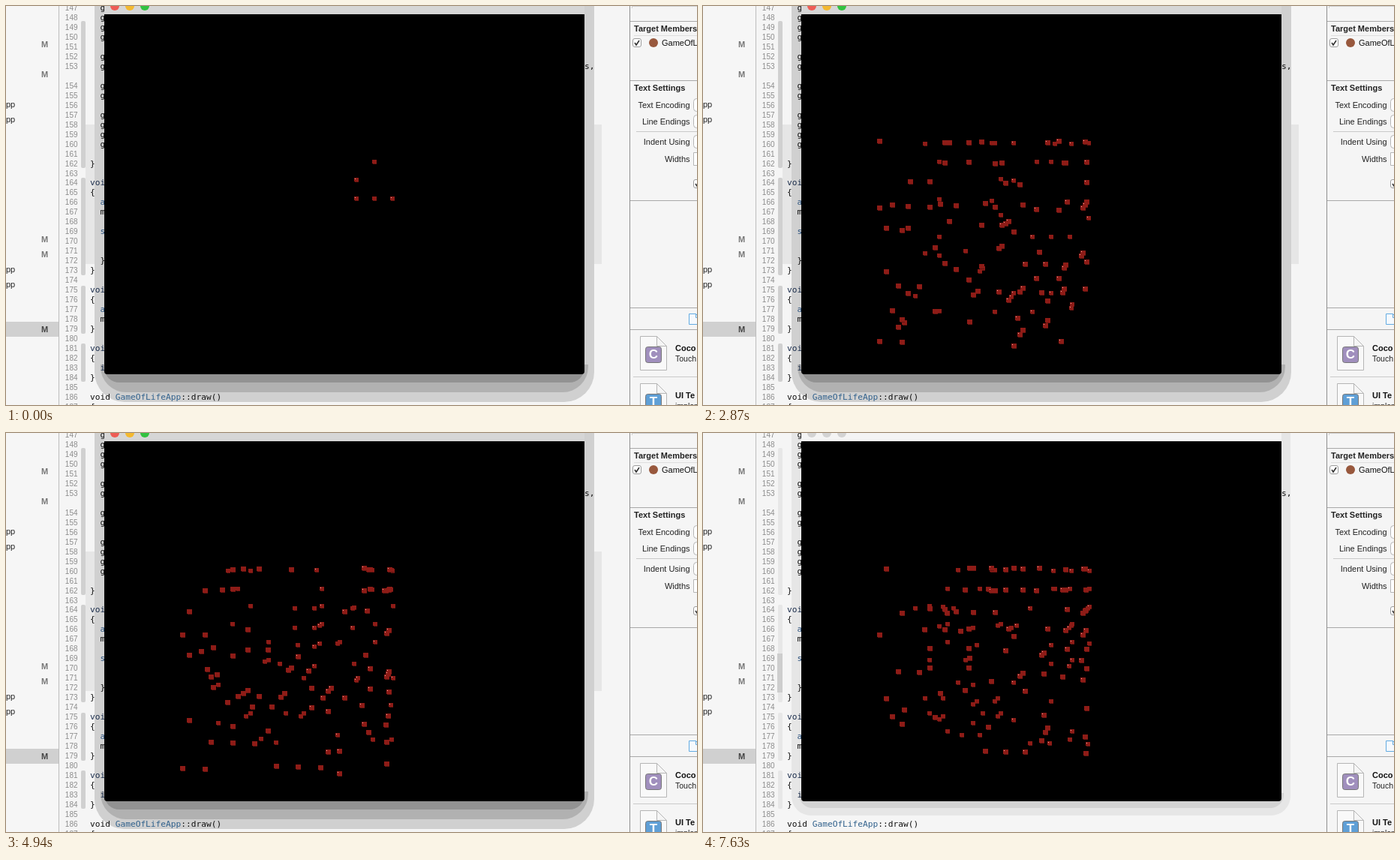
These frames come from a looping animation (921 by 532 pixels, 8000 ms). An HTML page with a canvas:

```html
<!DOCTYPE html>
<html lang="en">
<head>
<meta charset="utf-8">
<style>
html, body { margin: 0; width: 100%; height: 100%; overflow: hidden; background: #f5f5f5; }
canvas { display: block; }
</style>
</head>
<body>
<canvas id="stage" width="921" height="532"></canvas>
<script>
const ctx = document.getElementById('stage').getContext('2d');
const LOOP = 8000, SIZE = 10;
const UI = '"Liberation Sans", Arial, sans-serif';
const MONO = '"DejaVu Sans Mono", monospace';

// Start time of every generation after the first
const TICKS = [500, 640, 790, 940, 1240, 1390, 1680, 1830, 1980, 2270, 2420, 2570,
  2870, 3020, 3160, 3310, 3610, 3760, 4060, 4200, 4350, 4650, 4790, 4940,
  5240, 5390, 5540, 5840, 5990, 6140, 6440, 6590, 6730, 7030, 7630];
const BLUR_TIME = 7630;

function rect(x, y, w, h, color) {
  ctx.fillStyle = color;
  ctx.fillRect(x, y, w, h);
}

function round(x, y, w, h, r, fill, stroke) {
  ctx.beginPath();
  ctx.roundRect(x, y, w, h, r);
  if (fill) { ctx.fillStyle = fill; ctx.fill(); }
  if (stroke) { ctx.strokeStyle = stroke; ctx.lineWidth = 1; ctx.stroke(); }
}

function disc(x, y, r, color) {
  ctx.fillStyle = color;
  ctx.beginPath();
  ctx.arc(x, y, r, 0, Math.PI * 2);
  ctx.fill();
}

function text(str, x, y, font, color = '#111', align = 'left') {
  ctx.font = font;
  ctx.fillStyle = color;
  ctx.textAlign = align;
  ctx.textBaseline = 'alphabetic';
  ctx.fillText(str, x, y + 4);
}

// ---- Cells -------------------------------------------------------------

function hash(...values) {
  let h = 2166136261;
  for (const v of values) {
    h = Math.imul(h ^ (v + 31), 16777619);
    h = Math.imul(h ^ (h >>> 15), 2246822519);
  }
  h ^= h >>> 13;
  return (h >>> 0) / 4294967296;
}

function glider() {
  return [[8, 1], [7, 2], [7, 3], [8, 3], [9, 3]].map(([x, y]) => ({ x, y, z: 1 }));
}

// The colony spreads from the glider, then churns inside the whole cube
function grow(gen) {
  if (gen === 0) return glider();
  const depth = Math.min(9, Math.max(1, gen - 2));
  const bottom = Math.min(9, 3 + gen);
  const cells = [];
  for (let z = 0; z <= depth; z++)
    for (let y = 0; y <= bottom; y++)
      for (let x = 0; x < SIZE; x++) {
        if (x < 7 - gen && x > gen - 3) continue;
        const cluster = hash(x >> 1, y >> 1, z >> 1, gen >> 1, 7);
        const edge = (y === 0) + (y === 2) * 0.5 + (x === 9);
        cells.push({ x, y, z, score: hash(x, y, z, gen) + 0.3 * cluster + 0.06 * edge });
      }
  cells.sort((a, b) => b.score - a.score);
  return cells.slice(0, Math.min(5 + 13 * gen, 112 + gen)).sort((a, b) => a.z - b.z);
}

const generations = Array.from({ length: TICKS.length + 1 }, (_, gen) => grow(gen));

function drawCell({ x, y, z }) {
  const pitch = 1 / (0.04202 - 0.000965 * z);
  const tilt = 1 + (x - 3) * 0.004 * z / 9;
  const px = 559.5 + (x - 10.817) * pitch;
  const py = 196 + (y - 0.532) * pitch * tilt;
  const w = Math.round(pitch * 0.25), h = w - 1;
  const left = Math.round(px - w / 2), top = Math.round(py - h / 2);
  rect(left, top, w, h, '#8e1c17');
  rect(left + 1, top + h, w - 1, 1, '#681410');
  if (x > 4 && hash(x, y, z) > 0.35) rect(left + 1, top + 1, 1, 1, '#e9aaa4');
}

// ---- Editor ------------------------------------------------------------

const lineY = n => 15 + 12.97 * (n - 148 + (n > 153 ? 1 : 0));

function drawNavigator() {
  rect(0, 0, 70, 532, '#f6f6f6');
  rect(0, 421, 70, 20, '#d0d0d0');
  rect(70, 0, 1, 532, '#bcbcbc');
  for (const y of [51, 91, 311, 331, 431])
    text('M', 51.5, y, `bold 11px ${UI}`, y === 431 ? '#444' : '#777', 'center');
  for (const y of [131, 151, 351, 371]) text('pp', 0, y, `11px ${UI}`, '#222');
}

function drawRibbon(active) {
  const color = active ? '#d0d0d0' : '#e7e7e7';
  for (const [y, h] of [[20, 196], [229, 130], [373, 64], [450, 51]])
    round(100, y, 6, h, 2, color);
  if (!active) rect(99, 294, 7, 52, '#cdcdcd');
}

function drawShadow(active) {
  if (active) {
    round(118, -30, 666, 558, 40, '#d0d0d0');
    round(126, -30, 650, 545, 34, '#b1b1b1');
    rect(118, 0, 13, 478, '#d0d0d0');
    rect(771, 0, 13, 478, '#d0d0d0');
    round(131, 470, 640, 32, [0, 0, 20, 20], '#929292');
  } else {
    round(118, -30, 665, 540, 26, '#e6e6e6');
    round(128, -30, 646, 530, 18, '#d2d2d2');
    rect(118, 0, 13, 480, '#e6e6e6');
    rect(771, 0, 12, 480, '#e6e6e6');
  }
}

function drawCode() {
  const font = `11.2px ${MONO}`;
  const put = (str, x, lines, color) => lines.forEach(n => text(str, x, lineY(n), font, color));
  for (let n = 147; n <= 187; n++)
    text(n, 95.5, lineY(n), `10px ${UI}`, '#8c8c8c', 'right');
  put('g', 125.5, [147, 148, 149, 150, 152, 153, 154, 155, 157, 158, 159, 160]);
  put('}', 112, [162, 173, 179, 184]);
  put('{', 112, [165, 176, 182, 187]);
  put('void', 112, [164, 175, 181], '#1d2f4d');
  put('a', 125.5, [166, 177], '#2f5580');
  put('m', 125.5, [167, 178]);
  put('s', 125.5, [169], '#2f5580');
  put('}', 125.5, [172]);
  put('i', 125.5, [183], '#1d2f4d');
  put('s,', 771, [153]);
  put('void', 112, [186]);
  put('GameOfLifeApp', 145.7, [186], '#31618c');
  put('::draw()', 233.3, [186]);
}

// ---- Inspector ---------------------------------------------------------

function checkbox(x, y) {
  round(x + 0.5, y + 0.5, 11, 11, 2.5, '#fff', '#9c9c9c');
  ctx.strokeStyle = '#333';
  ctx.lineWidth = 1.6;
  ctx.beginPath();
  ctx.moveTo(x + 3, y + 6);
  ctx.lineTo(x + 5, y + 9);
  ctx.lineTo(x + 9, y + 3);
  ctx.stroke();
}

function sheet(x, y, w, h, fold, fill, stroke) {
  ctx.beginPath();
  ctx.moveTo(x, y);
  ctx.lineTo(x + w - fold, y);
  ctx.lineTo(x + w, y + fold);
  ctx.lineTo(x + w, y + h);
  ctx.lineTo(x, y + h);
  ctx.closePath();
  ctx.moveTo(x + w - fold, y);
  ctx.lineTo(x + w - fold, y + fold);
  ctx.lineTo(x + w, y + fold);
  ctx.fillStyle = fill;
  ctx.fill();
  ctx.strokeStyle = stroke;
  ctx.lineWidth = 1;
  ctx.stroke();
}

function template(y, letter, color, title, note) {
  sheet(845.5, y + 0.5, 35, 45, 13, '#f9f9f9', '#b5b5b5');
  round(852.5, y + 14.5, 21, 21, 3, color, '#777');
  text(letter, 863, y + 26, `bold 17px ${UI}`, '#fff', 'center');
  text(title, 892, y + 16, `bold 11px ${UI}`);
  text(note, 892, y + 29.5, `10.5px ${UI}`, '#222');
}

function drawInspector() {
  rect(832, 0, 89, 532, '#f5f5f5');
  rect(831, 0, 1, 532, '#8f8f8f');
  rect(834, 0, 87, 1, '#cfcfcf');
  rect(834, 0, 1, 3, '#cfcfcf');
  for (const y of [20, 99, 259, 402, 431]) rect(832, y, 89, 1, '#a9a9a9');
  rect(837, 39, 84, 1, '#dedede');
  rect(840, 167, 81, 1, '#c9c9c9');
  rect(836, 494, 85, 1, '#c9c9c9');

  text('Target Members', 837, 30, `bold 11px ${UI}`, '#222');
  checkbox(835, 43);
  disc(863, 49, 6, '#98583d');
  text('GameOfL', 874, 49, `11px ${UI}`);
  text('Text Settings', 837, 109, `bold 11px ${UI}`, '#222');
  [['Text Encoding', 132], ['Line Endings', 154], ['Indent Using', 181], ['Widths', 204]]
    .forEach(([label, y]) => {
      text(label, 911.5, y, `11px ${UI}`, '#222', 'right');
      round(916.5, y - 8.5, 20, 17, label === 'Widths' ? 0 : 4, '#fff', '#b5b5b5');
    });
  checkbox(916, 231);
  sheet(910.5, 410.5, 14, 14, 5, '#f5f9fd', '#62abe2');

  template(440, 'C', '#a08fbd', 'Coco', 'Touch');
  template(503, 'T', '#5f9fd6', 'UI Te', 'implem');
}

// ---- Scene -------------------------------------------------------------

function drawWindow(active) {
  rect(131, 0, 640, 11, active ? '#d6d6d6' : '#f4f4f4');
  const lights = active ? ['#ee5d55', '#f4b92f', '#32c240'] : ['#d3d3d3', '#d3d3d3', '#d3d3d3'];
  lights.forEach((color, i) => disc(145 + 20 * i, 0, 6, color));
  round(131, 11, 640, 480, [0, 0, 4, 4], '#000');
}

function draw(time) {
  const active = time < BLUR_TIME;
  const gen = TICKS.filter(t => t <= time).length;
  rect(0, 0, 921, 532, '#f5f5f5');
  drawNavigator();
  if (active) rect(106, 158, 688, 186, '#e6e6e6');
  drawRibbon(active);
  drawShadow(active);
  drawCode();
  drawInspector();
  drawWindow(active);
  generations[gen].forEach(drawCell);
}

function loop() {
  draw(performance.now() % LOOP);
  requestAnimationFrame(loop);
}
loop();
</script>
</body>
</html>
```
